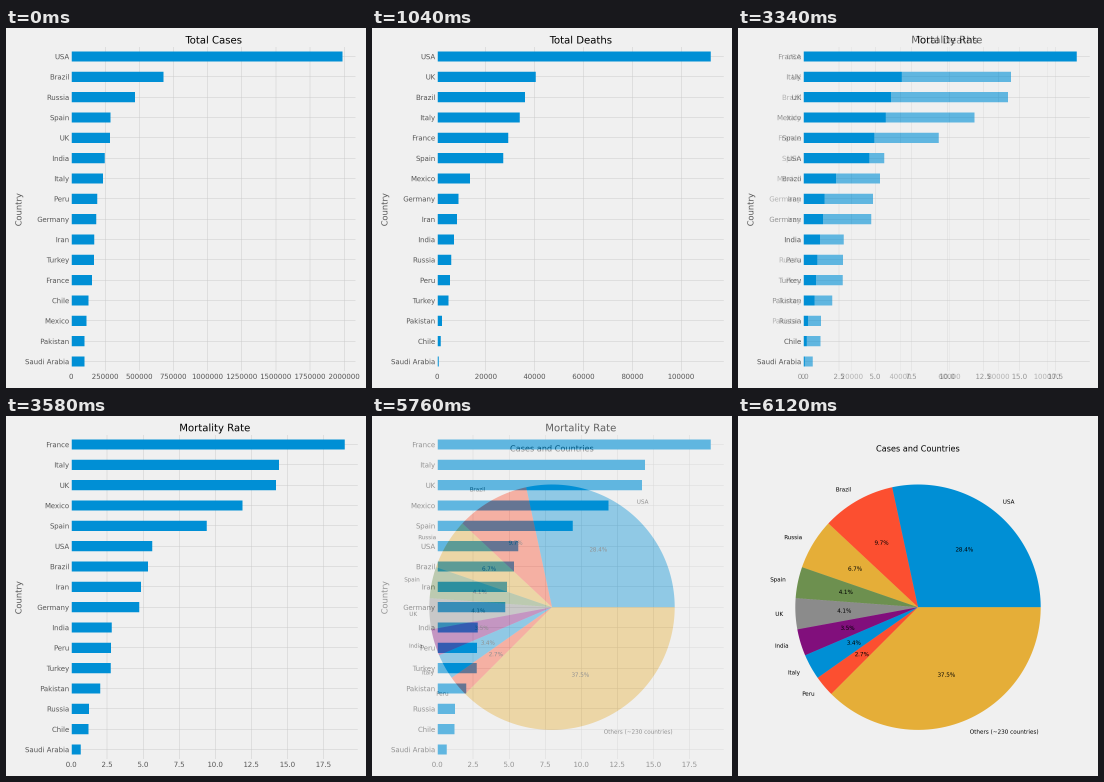
Recreate the animation shown at these times as a matplotlib script. Size 360 px wide and 360 px high, loop 8000 ms.

```python
import matplotlib.pyplot as plt
import numpy as np
from matplotlib.animation import FuncAnimation

SIZE, DPI, SUPER = 360, 36, 4
STEP, LOOP = 20, 8000
FADES = (500, 3040, 5580)
FADE_STEP, FADE_COUNT = 60, 10

BG, GRID, GREY = "#f0f0f0", "#cbcbcb", "#555555"
CYCLE = ["#008fd5", "#fc4f30", "#e5ae38", "#6d904f", "#8b8b8b", "#810f7c"]

# country: (cases, deaths)
DATA = {
    "USA": (1988461, 112096),
    "Brazil": (676494, 36044),
    "Russia": (467673, 5859),
    "Spain": (288390, 27135),
    "UK": (284868, 40465),
    "India": (246622, 6946),
    "Italy": (234801, 33846),
    "Peru": (191758, 5301),
    "Germany": (185696, 8769),
    "Iran": (169425, 8209),
    "Turkey": (169218, 4669),
    "France": (153634, 29142),
    "Chile": (127745, 1541),
    "Mexico": (113619, 13511),
    "Pakistan": (98943, 2002),
    "Saudi Arabia": (98869, 676),
}
OTHERS = 2627440

plt.rcParams.update({
    "font.family": "DejaVu Sans",
    "font.size": 14,
    "toolbar": "None",
})

fig = plt.figure(figsize=(SIZE / DPI, SIZE / DPI), dpi=DPI, facecolor=BG)


def add_axes(left, top, right, bottom):
    """Axes placed by stage pixels, y pointing down."""
    return fig.add_axes([left / SIZE, 1 - bottom / SIZE,
                         (right - left) / SIZE, (bottom - top) / SIZE],
                        facecolor=BG)


def bar_chart(title, values, tick, fmt, right=352.4):
    ax = add_axes(65, 18.3, right, 343.7)
    names = sorted(values, key=values.get)
    widths = [values[n] for n in names]
    ax.barh(range(len(names)), widths, height=0.5, color=CYCLE[0])
    ax.set_xlim(0, 1.05 * widths[-1])
    ax.set_ylim(-0.5, len(names) - 0.5)
    ticks = np.arange(0, 1.05 * widths[-1], tick)
    ax.set_xticks(ticks, [fmt.format(t) for t in ticks])
    ax.set_yticks(range(len(names)), names)
    ax.tick_params(length=0, pad=3.5, labelcolor=GREY, labelsize=14)
    ax.grid(color=GRID, linewidth=1)
    ax.set_axisbelow(True)
    for spine in ax.spines.values():
        spine.set(color=BG, linewidth=3)
    ax.set_title(title, fontsize=20.16, pad=6)
    ax.set_ylabel("Country", fontsize=16.8, color=GREY, labelpad=4)


def pie_chart():
    r = 122.7 * 1.25
    cx, cy = 180, 191.2
    ax = add_axes(cx - r, cy - r, cx + r, cy + r)
    names = list(DATA)[:8]
    sizes = [DATA[n][0] for n in names] + [OTHERS]
    colors = [CYCLE[i % len(CYCLE)] for i in range(len(sizes))]
    ax.pie(sizes, labels=names + ["Others (~230 countries)"], colors=colors,
           autopct="%.1f%%", textprops={"fontsize": 11.34})
    ax.set_title("Cases and Countries", fontsize=16.33, pad=4.9)


def render(draw, *args, **kwargs):
    """Draw a chart enlarged and average it down to stage size."""
    fig.clf()
    fig.set_dpi(DPI * SUPER)
    draw(*args, **kwargs)
    fig.canvas.draw()
    big = np.asarray(fig.canvas.buffer_rgba())[..., :3].astype(float)
    fig.clf()
    fig.set_dpi(DPI)
    return big.reshape(SIZE, SUPER, SIZE, SUPER, 3).mean(axis=(1, 3))


cases = {n: c for n, (c, d) in DATA.items()}
deaths = {n: d for n, (c, d) in DATA.items()}
rates = {n: 100 * d / c for n, (c, d) in DATA.items()}

charts = [
    render(bar_chart, "Total Cases", cases, 250000, "{:.0f}", right=350.2),
    render(bar_chart, "Total Deaths", deaths, 20000, "{:.0f}"),
    render(bar_chart, "Mortality Rate", rates, 2.5, "{:.1f}"),
    render(pie_chart),
]


def blend(t):
    """Stage at time t: each fade runs in equal, held steps."""
    picture = charts[0]
    for start, chart in zip(FADES, charts[1:]):
        if t >= start:
            k = min(FADE_COUNT, (t - start) // FADE_STEP + 1) / FADE_COUNT
            picture = picture * (1 - k) + chart * k
    return np.rint(picture).astype(np.uint8)


stage = fig.figimage(blend(0))


def update(i):
    stage.set_data(blend(i * STEP))
    return [stage]


anim = FuncAnimation(fig, update, frames=LOOP // STEP, interval=STEP,
                     repeat=True, repeat_delay=0)
plt.show()
```
